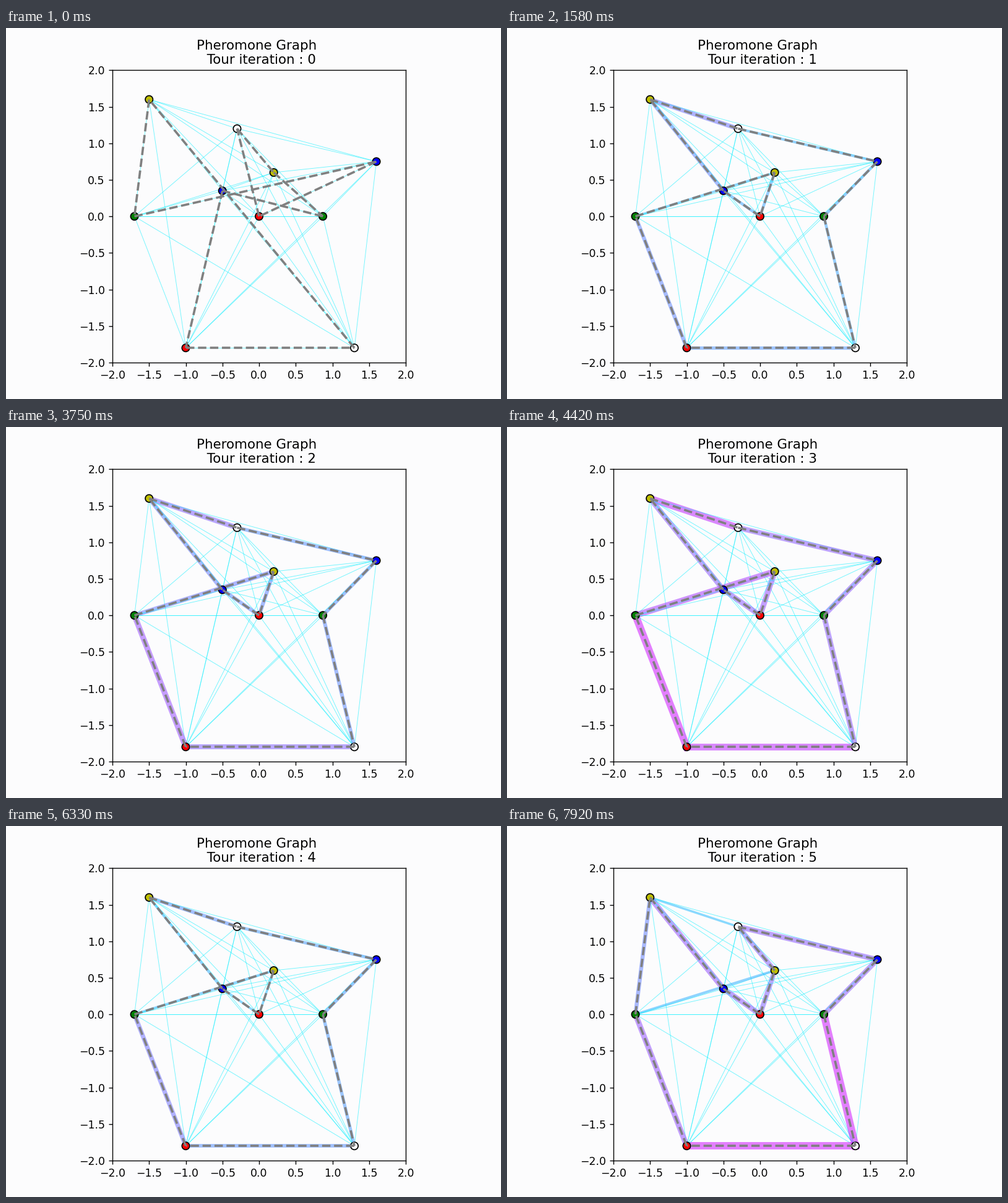
Write a matplotlib script that moves like this. It is 800x601 px and loops after 8 s.

```python
import numpy as np
import matplotlib.pyplot as plt
from itertools import combinations
from matplotlib.animation import FuncAnimation

W, H, DPI = 800, 601, 125
FRAMES, LOOP_MS = 96, 8000
TOUR_FRAMES = 17
PAPER = "#fcfcfd"
PX = 72 / DPI
THIN = 0.9

plt.rcParams["font.family"] = "DejaVu Sans"

# name: x, y, colour
CITIES = {
    "a": (-1.5, 1.6, "y"), "b": (-0.3, 1.2, PAPER), "c": (0.2, 0.6, "y"),
    "d": (1.6, 0.75, "b"), "e": (-0.5, 0.35, "b"), "f": (-1.7, 0, "g"),
    "g": (0, 0, "r"), "h": (0.87, 0, "g"), "i": (-1, -1.8, "r"),
    "j": (1.3, -1.8, PAPER),
}
TOURS = ["gbcheijafd", "abdhjifcge", "aegcbdhjif"]

# pheromone widths in pixels at a few moments
MOMENTS = [0, 19, 35, 53, 67, 76, 95]
LEVELS = {
    "ab": [8, 5.5, 11, 9, 5.5, 3.5],
    "bd": [4.5, 3.5, 8.5, 5.5, 5, 8.5],
    "dh": [5, 3.5, 8.5, 8, 5, 8.5],
    "hj": [5, 4, 8.5, 8, 5, 12],
    "ij": [6, 5.5, 11, 8, 5.5, 12],
    "fi": [7, 6.5, 12, 9, 7, 9],
    "cf": [4, 4.5, 10, 4, 4, 4],
    "cg": [5, 4, 9, 4.5, 3.5, 8],
    "eg": [5, 4, 8.5, 4.5, 3.5, 8.5],
    "ae": [7, 5, 8.5, 5, 4, 9],
    "bc": [THIN] * 5 + [8],
    "af": [THIN] * 5 + [6.5],
}


def level(edge, i):
    if edge not in LEVELS:
        return THIN
    return np.exp(np.interp(i, MOMENTS, np.log([THIN] + LEVELS[edge])))


def ends(edge):
    p, q = (CITIES[n] for n in edge)
    return [p[0], q[0]], [p[1], q[1]]


fig = plt.figure(figsize=(W / DPI, H / DPI), dpi=DPI, facecolor=PAPER)
ax = fig.add_axes([172 / W, (H - 541.9) / H, 474 / W, 473.5 / H],
                  facecolor=PAPER)
ax.set(xlim=(-2, 2), ylim=(-2, 2),
       xticks=np.arange(-2, 2.1, 0.5), yticks=np.arange(-2, 2.1, 0.5))
title = ax.set_title("", fontsize=12.3)
fig.add_artist(plt.Line2D([0, 1], [0.5 / H] * 2, color="#b0b0b0", lw=PX))

trails = {}
for pair in combinations(CITIES, 2):
    trails["".join(pair)], = ax.plot(*ends(pair), alpha=0.6, zorder=1)

xs, ys, colours = zip(*CITIES.values())
ax.scatter(xs, ys, s=50, c=colours, edgecolors="black", linewidths=1, zorder=2)

legs = [ax.plot([], [], "--", color="gray", lw=2.1, zorder=3)[0]
        for _ in CITIES]


def draw(i):
    count = i // TOUR_FRAMES
    title.set_text(f"Pheromone Graph \n Tour iteration : {count}")
    for edge, line in trails.items():
        width = level(edge, i)
        line.set_linewidth(width * PX)
        line.set_color(plt.cm.cool(width / 14.5))
    tour = TOURS[0 if count == 0 else 1 if count < 5 else 2]
    for line, edge in zip(legs, zip(tour, tour[1:] + tour[0])):
        line.set_data(*ends(edge))
    return [title, *trails.values(), *legs]


anim = FuncAnimation(fig, draw, frames=FRAMES, interval=LOOP_MS / FRAMES,
                     repeat=True, repeat_delay=0)
plt.show()
```
